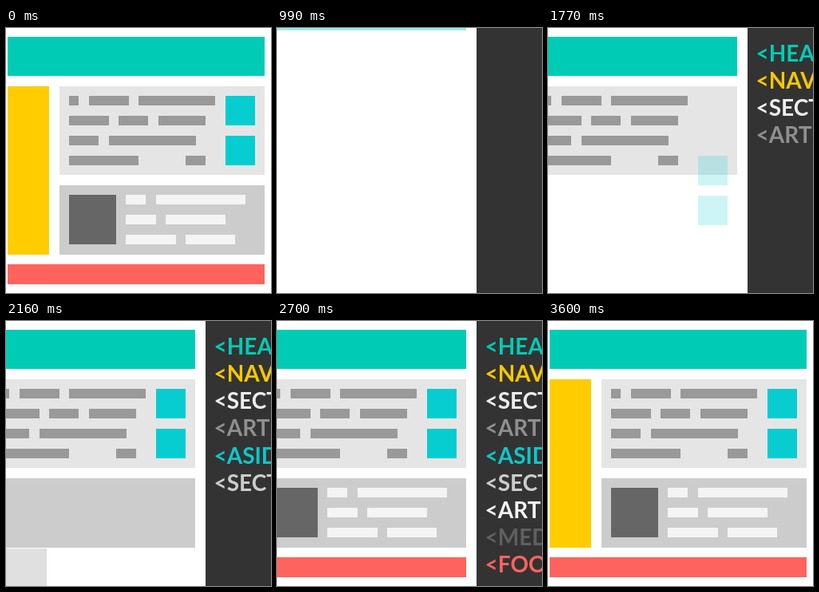
Write an HTML page with a canvas that moves like this. It is 332 px wide and 332 px high and loops after 5.55 s.

```html
<!DOCTYPE html>
<html lang="en">
<head>
<meta charset="utf-8">
<title>Page layout tags</title>
<style>
html, body { margin: 0; height: 100%; overflow: hidden; background: #fff; }
canvas { display: block; width: 332px; height: 332px; }
</style>
</head>
<body>
<canvas id="stage" width="332" height="332"></canvas>
<script>
const ctx = document.getElementById('stage').getContext('2d');
const LOOP = 5550, TICK = 30;

// Text-like bars: each row lists x, width pairs.
const bars = (y, rows) => rows.flatMap((row, r) => {
  const out = [];
  for (let i = 0; i < row.length; i += 2) out.push([row[i], y + 25 * r, row[i + 1], 12]);
  return out;
});

const grayBars = bars(85, [
  [79, 12, 104, 50, 166, 96],
  [79, 50, 141, 37, 191, 59],
  [79, 37, 129, 109],
  [79, 87, 225, 25]
]);
const whiteBars = bars(209, [
  [150, 25, 188, 112],
  [150, 38, 200, 75],
  [150, 63, 225, 62]
]);

// Blocks in order of arrival: colour, entry offset, rectangles.
const blocks = [
  ['#00ccb6', 0, -95, [[2, 11, 322, 49]]],
  ['#ffcc00', -145, 0, [[2, 73, 52, 211]]],
  ['#e5e5e5', 145, 0, [[67, 73, 257, 111]]],
  ['#999', 0, -94, grayBars],
  ['#07cdd0', 0, 94, [[275, 85, 37, 37], [275, 135, 37, 37]]],
  ['#ccc', 145, 0, [[67, 197, 257, 87]]],
  ['#666', 0, 95, [[79, 209, 59, 62]]],
  ['#f4f4f4', 0, -94, whiteBars],
  ['#ff635d', 145, 0, [[2, 296, 322, 25]]]
];

const tags = [
  ['<HEADER>', '#00ccb6'], ['<NAV>', '#f8c800'], ['<SECTION>', '#eee'],
  ['<ARTICLE>', '#8f8f8f'], ['<ASIDE>', '#0cc8cb'], ['<SECTION>', '#ccc'],
  ['<ARTICLE>', '#f4f4f4'], ['<MEDIA>', '#606060'], ['<FOOTER>', '#ff635d']
];

const clamp = (v, lo, hi) => Math.min(hi, Math.max(lo, v));

// Linear slide in n even steps, each about 35 ms.
const slide = (t, start, n) => clamp(Math.ceil((t - start) / 35 - 0.3), 0, n) / n;

// Arrival of item i in five steps, three items per 600 ms.
const arrive = (t, i) => {
  const start = 960 + 600 * Math.floor(i / 3) + 210 * (i % 3);
  return clamp((t - start) / TICK + 1, 0, 5) / 5;
};

function draw(ms) {
  const t = Math.floor(ms / TICK) * TICK;
  const opening = t < 240;
  const open = slide(t, 30, 6) - slide(t, 3180, 12);
  const shift = -87 * open;
  const panelX = 424 - 174 * open;

  ctx.globalAlpha = 1;
  ctx.fillStyle = '#fff';
  ctx.fillRect(0, 0, 332, 332);

  blocks.forEach(([color, dx, dy, rects], i) => {
    const p = opening ? 1 : arrive(t, i);
    ctx.globalAlpha = opening ? 1 - open : p;
    ctx.fillStyle = color;
    for (const [x, y, w, h] of rects) {
      ctx.fillRect(x + shift + dx * (1 - p), y + dy * (1 - p), w, h);
    }
  });

  ctx.globalAlpha = 1;
  ctx.fillStyle = '#333';
  ctx.fillRect(panelX, 0, 332, 332);

  ctx.font = '700 28px Lato, sans-serif';
  tags.forEach(([text, color], i) => {
    const p = arrive(t, i);
    ctx.globalAlpha = p;
    ctx.fillStyle = color;
    ctx.fillText(text, panelX + 10.5 + 160 * (1 - p), 42 + 34.15 * i);
  });
}

let begin;
function frame(now) {
  begin ??= now;
  draw((now - begin) % LOOP);
  requestAnimationFrame(frame);
}
requestAnimationFrame(frame);
</script>
</body>
</html>
```
